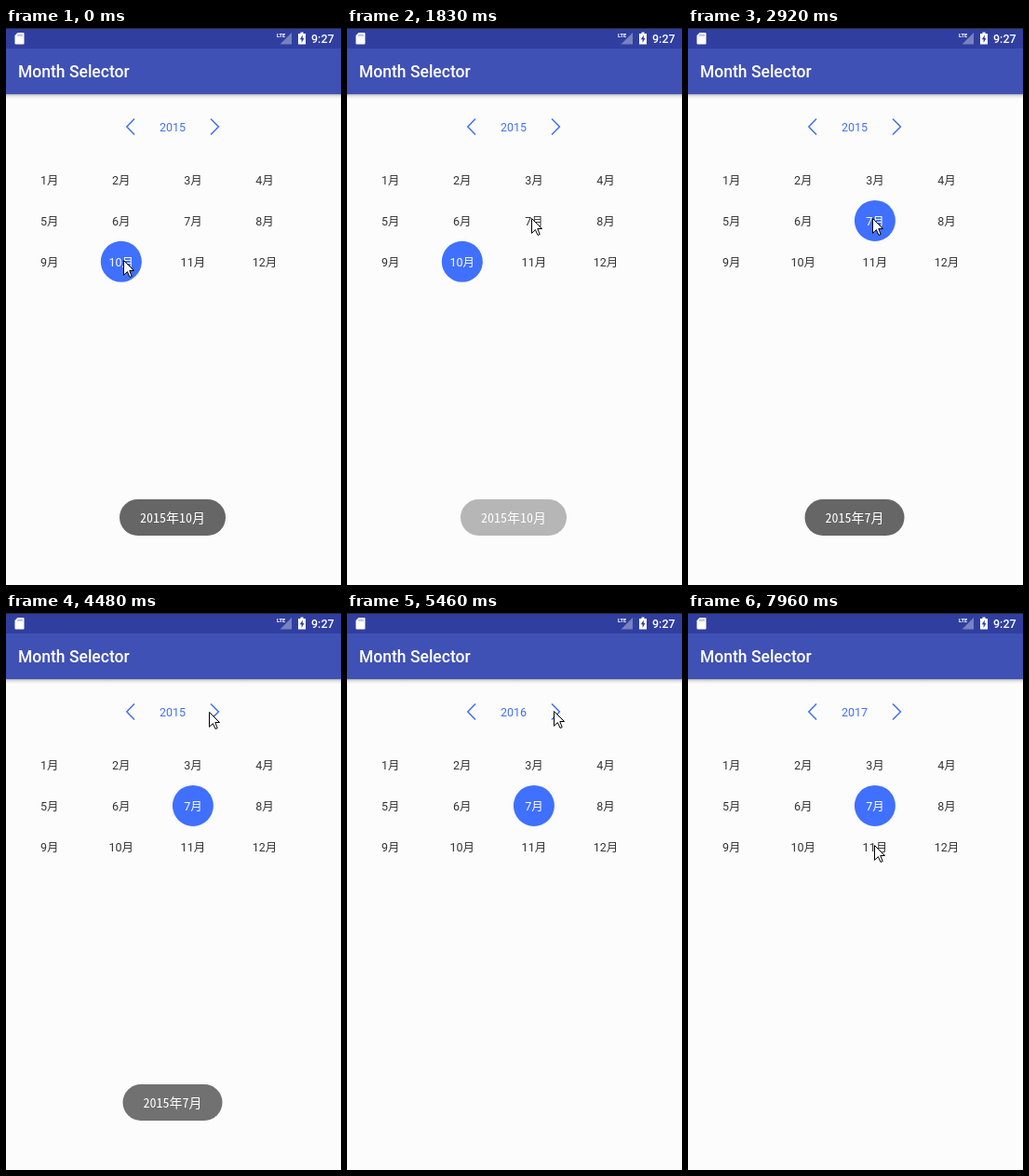
An HTML page for the animation above (8000 ms loop, 360x598 px).

```html
<!DOCTYPE html>
<html lang="zh">
<head>
<meta charset="utf-8">
<style>
  html, body { margin: 0; width: 100%; height: 100%; overflow: hidden; background: #fcfcfc; }
  svg { display: block; width: 360px; height: 598px; }
  text { font-family: Roboto, "Noto Sans CJK SC", "Noto Sans CJK JP", sans-serif; font-size: 12.5px; }
  .mid { text-anchor: middle; }
  .bold { font-weight: 500; fill: #fff; }
  .title { font-size: 17.5px; }
  .tiny { font-size: 5.5px; font-weight: 900; }
  #note { font-family: "Noto Sans Mono CJK SC", "Noto Sans Mono CJK JP", "Noto Sans CJK SC", monospace; font-size: 14px; fill: #fff; }
</style>
</head>
<body>
<svg viewBox="0 0 360 598">
  <defs>
    <linearGradient id="shade" x2="0" y2="1">
      <stop offset="0" stop-opacity=".3"/>
      <stop offset=".4" stop-opacity=".1"/>
      <stop offset="1" stop-opacity="0"/>
    </linearGradient>
  </defs>
  <rect width="360" height="598" fill="#fcfcfc"/>
  <rect y="71" width="360" height="5" fill="url(#shade)"/>
  <rect y="22" width="360" height="49" fill="#3f51b5"/>
  <rect width="360" height="22" fill="#303f9f"/>
  <rect width="360" height="1" fill="#282a36"/>

  <!-- status icons -->
  <path d="M12.5 5H18.5Q19.5 5 19.5 6V16.5Q19.5 17.5 18.5 17.5H10.5Q9.5 17.5 9.5 16.5V8Z" fill="#fff"/>
  <path d="M13 6.5v2.5M15 6.5v2.5M17 6.5v2.5" stroke="#8b93c9"/>
  <path d="M307 5V17.5H294.5Z" fill="#fff" opacity=".35"/>
  <text x="291" y="10" class="bold tiny">LTE</text>
  <path d="M314 6H316.5V4.5H319.5V6H322V17.5H314Z" fill="#fff"/>
  <path d="M318.8 7.5L315.8 12.3H317.6V16L320.4 11H318.8Z" fill="#303f9f"/>
  <text x="328" y="16" class="bold">9:27</text>

  <text x="13" y="53" class="bold title">Month Selector</text>

  <g fill="none" stroke="#4070f4" stroke-width="1.5">
    <path d="M138 97.5L129.8 106L138 114.5"/>
    <path d="M220 97.5L228.4 106L220 114.5"/>
  </g>
  <text id="year" class="mid" x="179" y="111" fill="#4070f4"></text>

  <circle id="dot" r="22" fill="#4070ff"/>
  <g id="months"></g>

  <g id="toast">
    <rect id="pill" y="506" height="39" rx="19.5" fill="#666"/>
    <text id="note" class="mid" x="179" y="531"></text>
  </g>

  <path id="cursor" d="M.5 .5V16.3L4.4 12.6L7 18.4L9.2 17.6L6.8 11.5H11.5Z" fill="#fff" stroke="#000" stroke-linejoin="round"/>
</svg>
<script>
const $ = id => document.getElementById(id);
const set = (node, attrs) => Object.entries(attrs).forEach(([k, v]) => node.setAttribute(k, v));
const LOOP = 8000;
const TICK = 400 / 3; // the screen refreshes 7.5 times a second

// pointer glides: first tick, last tick, destination
const glides = [
  [5, 6, 192, 162], [6, 12, 198, 204],
  [30, 33, 210, 123], [33, 34, 218, 106], [34, 37, 222, 105],
  [48, 51, 203, 205], [51, 55, 178, 263], [55, 57, 178, 268], [57, 60, 200, 249]
];

const ramp = (t, from, to) => Math.min(1, Math.max(0, (t - from) / (to - from)));
const easeOut = (u, power) => 1 - (1 - u) ** power;
const fadeIn = (t, start) => easeOut(ramp(t, start, start + 470), 2);
const fadeOut = (t, start) => 1 - ramp(t, start, start + 500) ** 2;

const pointer = tick => glides.reduce(([x, y], [from, to, toX, toY]) => {
  const u = easeOut(ramp(tick, from, to), 1.5);
  return [x + (toX - x) * u, y + (toY - y) * u].map(Math.round);
}, [126, 249]);

const center = i => [46.7 + i % 4 * 77.1, 163 + Math.floor(i / 4) * 43.9];
const labels = Array.from({ length: 12 }, (_, i) => {
  const [x, y] = center(i);
  const label = document.createElementNS("http://www.w3.org/2000/svg", "text");
  set(label, { class: "mid", x, y: Math.round(y + 5) });
  label.textContent = i + 1 + "月";
  return $("months").appendChild(label);
});

function draw(now) {
  const t = now % LOOP;
  const tick = Math.floor(t / TICK + .5);
  const shown = (tick - .5) * TICK;

  set($("cursor"), { transform: `translate(${pointer(tick)})` });

  const month = t < 2380 ? 10 : 7;
  const [cx, cy] = center(month - 1);
  set($("dot"), { cx, cy });
  labels.forEach((label, i) => set(label, { fill: i + 1 === month ? "#fff" : "#333" }));

  $("year").textContent = 2015 + (t >= 5460) + (t >= 6180);

  $("note").textContent = `2015年${month}月`;
  const width = 37 + 7 * $("note").textContent.length + 21;
  set($("pill"), { x: 179 - width / 2, width });
  set($("toast"), {
    opacity: month === 10 ? fadeOut(shown, 1433) : fadeIn(shown, 2400) * fadeOut(shown, 4330)
  });
}

const begin = performance.now();
function loop() {
  draw(performance.now() - begin);
  requestAnimationFrame(loop);
}
loop();
</script>
</body>
</html>
```
